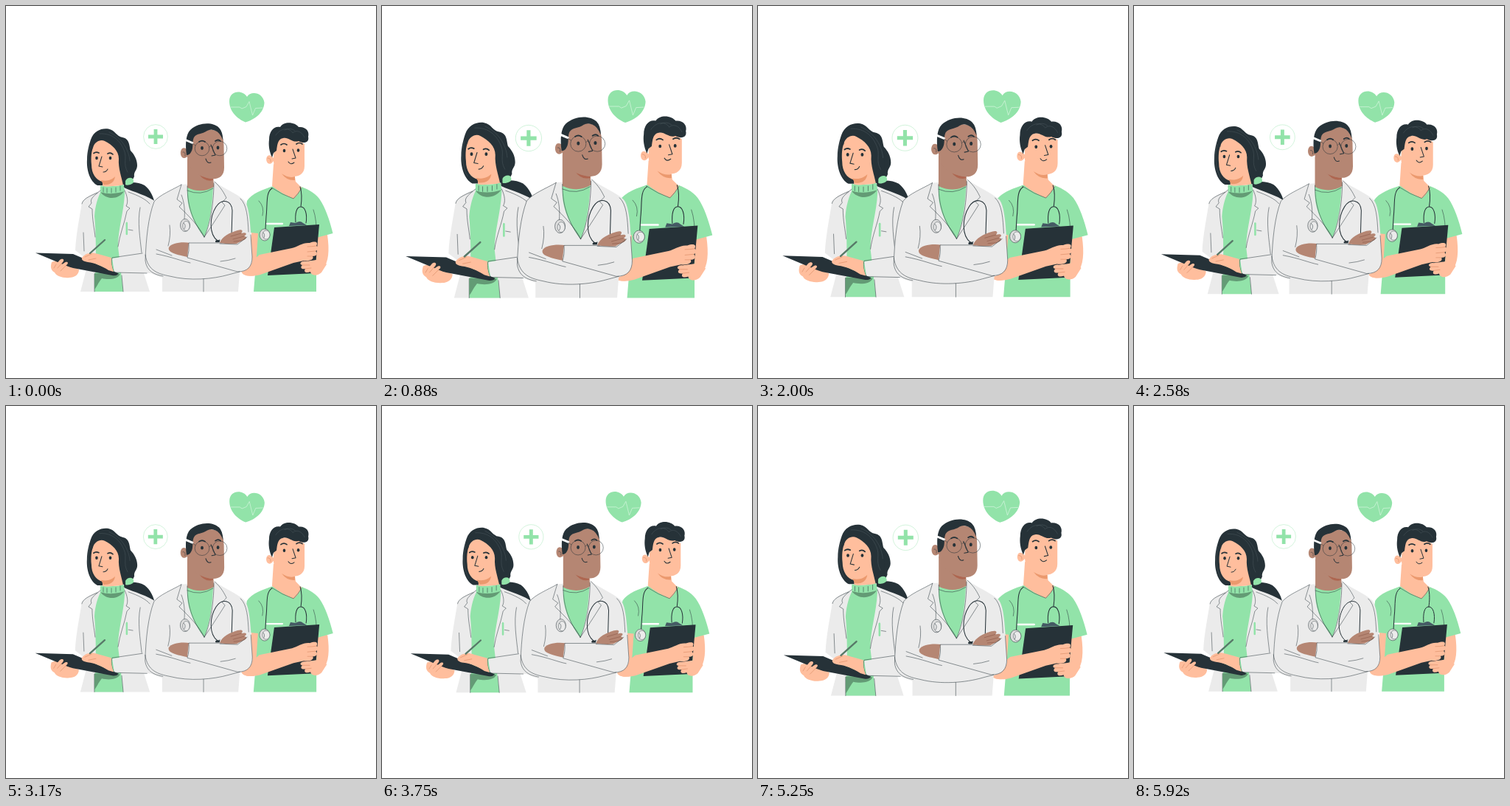
Recreate the animation shown at these times as an HTML page. Size 502x504 px, loop 5960 ms.

```html
<!DOCTYPE html>
<html lang="en">
<head>
<meta charset="utf-8">
<title>Medical team</title>
<style>
html, body { margin: 0; width: 100%; height: 100%; overflow: hidden; background: #fff; }
svg { display: block; width: 100vw; height: 100vh; }
path, line { stroke-linecap: round; stroke-linejoin: round; }
.dark { fill: #263238; }
.green { fill: #92e3a9; }
.shade { fill: #639b75; }
.coat { fill: #ebebeb; }
.skin { fill: #ffbe9d; }
.blush { fill: #eb996e; }
.brown { fill: #b58673; }
.umber { fill: #ae6650; }
.line { fill: none; stroke: #263238; stroke-width: .5; }
.bold { fill: none; stroke: #263238; stroke-width: 1; }
.brow { fill: none; stroke: #263238; stroke-width: 1.7; }
.pale { fill: none; stroke: #d5f5de; stroke-width: .7; }
.crease { fill: none; stroke: #d98b65; stroke-width: .6; }
.strand { fill: none; stroke: #536066; stroke-width: .4; }
</style>
</head>
<body>
<svg viewBox="0 0 502 504" preserveAspectRatio="none">
  <g id="icons">
    <circle cx="203" cy="177" r="16.4" fill="#fff" stroke="#92e3a9" stroke-width=".4"/>
    <path class="green" d="M200.6 167h4.8v7.6h7.6v4.8h-7.6v7.6h-4.8v-7.6h-7.6v-4.8h7.6z"/>
    <path class="green" d="M327 123C321 113 303 114 303 129C303 143 314 153 325 157.500C337 154 350 145 350.500 131C349 117 332 114 327 123Z"/>
    <path class="pale" d="M305 137H317L320 139L326 136.500L330 129.500L334.500 148L338.500 138.500L348 138"/>
  </g>

  <g id="woman">
    <path class="dark" d="M160 240C171 238 181 239 188 243C196 249 201 260 202 269C194 271 185 264 177 257C171 251 164 249 160 246Z"/>
    <path class="dark" d="M124 243C114 238 109 222 110 208C110 197 113 187 115 181C119 169 130 165 139 166.500C148 168 150 177 158 178C168 180 167 189 169 196C174 201 178 208 178 216C178 223 173 224 174 231C171 240 160 243 152 243Z"/>
    <path class="coat" d="M129 249C119 254 107 259 103 266C100 286 95 309 94 331L112 345L101 387H195L187 362H204V266C193 257 173 252 160 246Z"/>
    <path class="green" d="M128 245L160 243L161 254C160 279 152 302 152 326L159 387H120C123 343 122 304 120 285C121 270 125 258 129 251Z"/>
    <path class="shade" d="M128 252Q145 256 161 250C153 263 136 263 128 252Z"/>
    <path class="skin" d="M118 192C120 184 128 180 134 183C144 188 153 196 153 207C152 220 157 232 159 243L131 245V238C122 236 116 227 116 215C115 205 116 197 118 192Z"/>
    <path class="blush" d="M129 236C138 238 144 235 148 231C147 239 141 243 132 242Z"/>
    <path class="dark" d="M118 194C117 181 132 174 143 182C151 188 155 195 155 207C154 219 158 228 160 241C168 234 171 225 170 212C169 198 163 181 149 174C138 168 122 169 116 184Z"/>
    <path class="green" d="M128 243Q144 248 159 242L161 251Q143 257 128 252Z"/>
    <path class="line" d="M132 246v6M137 247v6M143 247v6M149 246v6M155 244v6"/>
    <path class="green" d="M162 237C164 232 173 231 173 237C175 241 164 244 162 242Z"/>
    <ellipse class="dark" cx="123" cy="206" rx="1.800" ry="2.200"/><ellipse class="dark" cx="141.500" cy="206" rx="1.800" ry="2.200"/>
    <path class="brow" d="M119 199.500Q122 197 126 199M138 200Q142 198 145 201"/>
    <path class="bold" d="M130 204L126 217L131 218M132 225Q136 225 138 221"/>
    <path class="strand" d="M127 173C145 172 155 183 160 195C165 206 158 213 165 225M140 171C157 178 167 195 168 210M114 190C110 202 111 222 118 234"/>
    <path class="line" d="M128 250C121 256 113 261 116 267L112 272L117 275C117 290 120 302 121 313M161 250C165 258 166 266 163 271L168 274L164 278C161 294 154 310 152 326M124 253C112 258 104 262 103 268M105 307L106 332M166 252C180 257 190 262 195 268M182 273C178 292 182 315 184 334M120 363L120 387M157 365L159 387"/>
    <path class="line" d="M166 303L172 304"/>
    <path d="M163.800 294v15" stroke="#92e3a9" stroke-width="2.500"/>
    <path class="coat" d="M144 342C157 340 177 337 197 336V362L147 361Z"/>
    <path class="line" d="M185 335L144 341C142 347 144 356 147 361L191 362"/>
    <path class="shade" d="M120 362L155 363C152 371 138 371 130 369C125 375 123 381 120 384Z"/>
    <path class="skin" d="M62 347C68 344 77 347 83 350L99 357C99 364 93 368 86 368C78 369 68 366 66 361C59 357 61 351 62 347Z"/>
    <path class="dark" d="M40 334.500L91 336L153 362.500Q150 366 144 365L91 355Q87 354 82 352Z"/>
    <path class="skin" d="M62 348C65 345 69 346 68 350L73 344C77 341 80 344 77 347L72 353L79 348C83 345 86 348 82 351L75 359Q66 359 62 354Z"/>
    <path class="crease" d="M68 350L65 355M77 347L70 355M82 351L74 359"/>
    <path class="skin" d="M103 341C108 334 117 333 125 336L143 341Q142 350 146 360L139 358C130 352 120 348 111 347C105 346 102 344 103 341Z"/>
    <path d="M134 317L114 335" stroke="#577968" stroke-width="2.300"/>
    <path class="crease" d="M107 340L116 336M112 344L122 342"/>
  </g>

  <g id="nurse">
    <path class="skin" d="M333 301C334 329 320 343 319 357C319 365 328 367 337 365L362 357V330L345 337L349 304Z"/>
    <path class="skin" d="M417 308L436 310C439 331 438 347 430 356C423 364 410 361 407 357L418 335Z"/>
    <path class="green" d="M363 244C350 248 333 254 327 264L321 306L342 308L340 338L336 387H421V314L443.500 308C439 290 433 272 425 261C418 252 407 247 398 244Z"/>
    <path class="skin" d="M363 214L391 225L393 238L401 246Q396 257 390 261Q375 255 361 244Z"/>
    <path class="blush" d="M374 227Q384 234 392 231L392 236Q381 237 374 227Z"/>
    <path class="skin" d="M364 181C375 176 394 179 405 187V217C405 227 398 231 390 231C376 231 363 222 363 210C356 220 350 208 355 203C358 201 361 204 363 206Z"/>
    <path class="dark" d="M361 205C357 197 356 188 357 181C357 169 364 162 372 164C378 155 393 158 397 164C407 163 412 170 410 177C412 185 404 187 397 183C389 186 383 177 376 179C368 180 368 190 367 196L363 199Z"/>
    <path class="strand" d="M366 175C374 163 386 166 389 172C396 166 403 173 405 178M378 168Q386 164 392 169"/>
    <path class="crease" d="M355 206Q360 206 359 211"/>
    <ellipse class="dark" cx="377.500" cy="196" rx="1.800" ry="2.200"/><ellipse class="dark" cx="396.500" cy="195.500" rx="1.800" ry="2.200"/>
    <path class="brow" d="M373 188Q377 185 381 188M394 187Q398 184 402 187"/>
    <path class="bold" d="M389 194L393 206L388 207M383 211Q386 216 391 212"/>
    <path class="line" d="M360 246Q375 256 390 261Q397 254 401 247M343 264Q351 272 348 284M417 276Q422 290 421 313"/>
    <path d="M354 295H375" stroke="#fff" stroke-width="2.300"/>
    <path class="bold" d="M361 247C352 252 355 269 353 285L352 302M399 245C402 254 401 265 400 272M393 293C392 281 394 272 400 272C406 272 409 282 407 294"/>
    <ellipse cx="351" cy="310" rx="7" ry="8" fill="#ddd" stroke="#263238" stroke-width=".5"/>
    <ellipse cx="353" cy="310" rx="5" ry="6" fill="#ebebeb" stroke="#263238" stroke-width=".4"/>
    <path class="line" d="M349 307Q352 309 350 314"/>
    <path class="dark" d="M364 300L425 296L419 362L355 365Z"/>
    <path d="M384 298L386 293L393 294Q399 290 403 294L408 297Z" fill="#455a64"/>
    <path class="skin" d="M344 337L388 328C396 326 403 320 412 321C420 318 424 320 421 325C425 327 423 331 420 332C424 336 421 339 416 339C419 344 410 346 404 345L390 348L345 364C330 368 319 365 319 357Z"/>
    <path class="crease" d="M409 326Q415 326 421 325M409 333L420 332M409 339L416 339"/>
    <path class="skin" d="M428 342C420 345 412 345 406 346C400 345 397 350 402 351C398 355 402 357 406 356C403 361 408 362 413 360C414 366 423 366 428 361L435 350Z"/>
    <path class="crease" d="M402 351L412 351M406 356L414 355"/>
  </g>

  <g id="doctor">
    <path class="coat" d="M238 242C227 249 208 256 201 265C194 284 190 310 189 335C188 350 190 360 201 364L212 368V387H315L317 361C330 357 335 350 334 339L332 305C331 289 329 269 323 263C313 254 295 247 283 238Z"/>
    <path class="green" d="M246 244L281 240C281 264 277 294 269 313C257 298 247 278 246 258Z"/>
    <path class="brown" d="M246 207L281 228L282 245Q265 255 246 246Z"/>
    <path class="line" d="M246 250Q264 258 281 247"/>
    <path class="umber" d="M262 228Q272 234 281 234V236Q270 239 262 228Z"/>
    <path class="brown" d="M246 181C250 168 275 163 290 171Q295 177 295.500 188L296 219C296 231 288 235 279 234C262 232 246 222 246 204C238 211 234 198 239 193Q243 191 246 195Z"/>
    <path class="dark" d="M245 202C243 187 244 174 250 168C262 157 281 157 289 165Q294 170 294.500 182Q290 171 284 169Q278 166 273 169C266 174 259 172 255 178C252 184 255 192 251 198Q249 202 245 202Z"/>
    <path d="M243.500 181.500L253 185.500" stroke="#fff" stroke-width="2.800"/>
    <path class="line" d="M240 198Q244 197 243 203M253 186L257 189M276 191Q278 188 280 191"/>
    <circle class="line" cx="266" cy="193" r="9.800"/><circle class="line" cx="290" cy="193" r="9.800"/>
    <ellipse class="dark" cx="266" cy="192.500" rx="1.900" ry="2.400"/><ellipse class="dark" cx="287.500" cy="192" rx="1.900" ry="2.400"/>
    <path class="brow" d="M262 184Q266 181 270 184M284 183Q288 180 291 183"/>
    <path class="bold" d="M278 188L284 202L279 203M271 207Q273 214 278 212"/>
    <path class="line" d="M238 242L232 262L239 267L235 272C248 284 264 301 269 313M246 244C246 275 255 293 269 313M283 238C292 246 296 254 299 260L293 266L297 270C287 286 277 301 269 313M282 240C282 270 276 298 269 313"/>
    <path class="line" d="M238 242C226 249 208 256 201 265C193 286 190 315 189 345C191 360 202 364 213 366M222 297Q224 310 220 325M204 330L225 338M318 261C327 269 328 287 329 306"/>
    <path class="line" d="M238 256C242 266 243 278 242 289"/>
    <ellipse cx="243" cy="297" rx="6.500" ry="8.500" fill="#ddd" stroke="#263238" stroke-width=".5"/>
    <ellipse cx="244.500" cy="298" rx="4.700" ry="6.500" fill="#ebebeb" stroke="#263238" stroke-width=".4"/>
    <path class="line" d="M241 294Q245 297 242 302"/>
    <path class="bold" d="M287 318C275 309 276 286 285 272C293 260 306 263 307 277L306 311M290 317L287 319"/>
    <ellipse class="dark" cx="287" cy="319" rx="3" ry="2"/>
    <path class="brown" d="M250 321C239 319 224 321 221 327C219 333 227 336 246 340Z"/>
    <path class="coat" d="M248 321L293 320C308 316 326 316 332 321L334 344C333 354 325 361 314 360L246 341Z"/>
    <path class="line" d="M293 321L248 321Q249 332 246 341L314 360C328 360 334 353 334 340L332 310"/>
    <path class="brown" d="M290 321C293 312 304 307 314 304C321 302 322 305 319 308C326 306 328 309 323 312C329 312 325 317 320 318L313 322Q302 323 290 321Z"/>
    <path d="M305 312L319 308M308 316L323 312M309 319L320 318" stroke="#8c5948" stroke-width=".6"/>
    <path class="line" d="M290 322L314 323L327 313M189 337C192 359 207 363 222 366C249 373 281 370 302 364L317 360M204 336C226 340 239 346 250 348M268 370V387M291 346Q302 345 311 342"/>
  </g>
</svg>
<script>
const LOOP = 5960;

// Turning points of the breathing scale: [ms, scale]
const BEATS = [[0, 1], [1200, 1.091], [3460, 1], [4680, 1.091], [5920, 0.997], [LOOP, 1]];

// Each group swells around its own centre
const CENTRES = {
  icons: [257, 150],
  woman: [143, 276],
  nurse: [381, 275],
  doctor: [262, 277]
};

const groups = Object.entries(CENTRES).map(([id, centre]) => [document.getElementById(id), centre]);
const ease = u => (1 - Math.cos(Math.PI * u)) / 2;

function scaleAt(ms) {
  const next = BEATS.findIndex(([time]) => time > ms);
  const [t0, s0] = BEATS[next - 1];
  const [t1, s1] = BEATS[next];
  return s0 + (s1 - s0) * ease((ms - t0) / (t1 - t0));
}

function draw(ms) {
  const scale = scaleAt(ms % LOOP);
  for (const [group, [x, y]] of groups) {
    group.setAttribute("transform", `translate(${x} ${y}) scale(${scale}) translate(${-x} ${-y})`);
  }
}

const start = performance.now();
function tick() {
  draw(performance.now() - start);
  requestAnimationFrame(tick);
}
tick();
</script>
</body>
</html>
```
